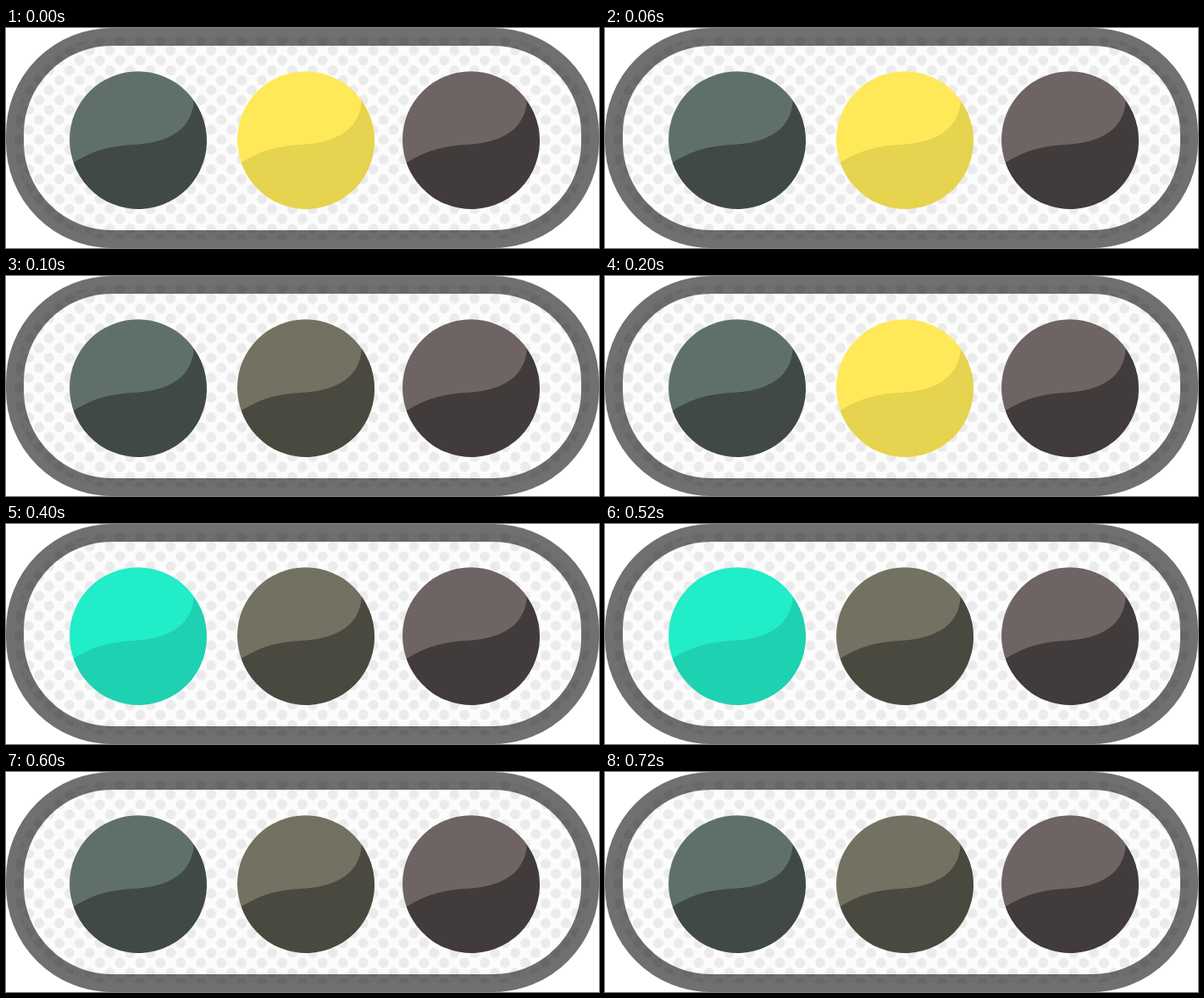
An HTML page that plays this animation: 700 by 260 pixels, repeating every 0.8 s.

```html
<!DOCTYPE html>
<html lang="en">
<head>
<meta charset="utf-8">
<title>Signal lights</title>
<style>
  html, body { margin: 0; width: 100%; height: 100%; overflow: hidden; background: #fff; }
  svg { display: block; }
</style>
</head>
<body>
<svg width="700" height="260" viewBox="0 0 700 260">
  <defs>
    <pattern id="dots" x="27" y="120.3" width="23.92" height="23.4" patternUnits="userSpaceOnUse">
      <g fill="#ebebeb">
        <circle cx="11.96" cy="11.7" r="6"/>
        <circle cx="0" cy="0" r="6"/>
        <circle cx="23.92" cy="0" r="6"/>
        <circle cx="0" cy="23.4" r="6"/>
        <circle cx="23.92" cy="23.4" r="6"/>
      </g>
    </pattern>
    <rect id="housing" x="10.5" y="10.5" width="679" height="239" rx="114.5"/>
    <circle id="lens" r="80.75"/>
    <path id="shade" d="M-76 27C-56 15-38 8-8 6C40 4 64-14 66-46A80.75 80.75 0 1 1-76 27Z"/>
  </defs>
  <use href="#housing" fill="#fcfcfc"/>
  <use href="#housing" fill="url(#dots)"/>
  <use href="#housing" fill="none" stroke="#000" stroke-opacity=".56" stroke-width="21"/>
  <g id="green" transform="translate(155.75 132)"><use href="#lens"/><use href="#shade"/></g>
  <g id="yellow" transform="translate(353.75 132)"><use href="#lens"/><use href="#shade"/></g>
  <g id="red" transform="translate(548.75 132)"><use href="#lens"/><use href="#shade"/></g>
</svg>
<script>
const LOOP = 800;

// Each colour pair is [lens, shade].
const palette = {
  green: { off: ['#5f706b', '#404947'], on: ['#21edc8', '#1ed1b1'] },
  yellow: { off: ['#737262', '#4a4940'], on: ['#ffe959', '#e6d34f'] },
  red: { off: ['#6d6463', '#413c3b'] }
};

function paint(name, lit) {
  const colors = palette[name][lit ? 'on' : 'off'];
  [...document.getElementById(name).children].forEach((part, i) => {
    part.setAttribute('fill', colors[i]);
  });
}

function draw() {
  const t = performance.now() % LOOP;
  paint('yellow', t < 400 && t % 200 < 100);
  paint('green', t >= 400 && t < 600);
  requestAnimationFrame(draw);
}

paint('red', false);
draw();
</script>
</body>
</html>
```
